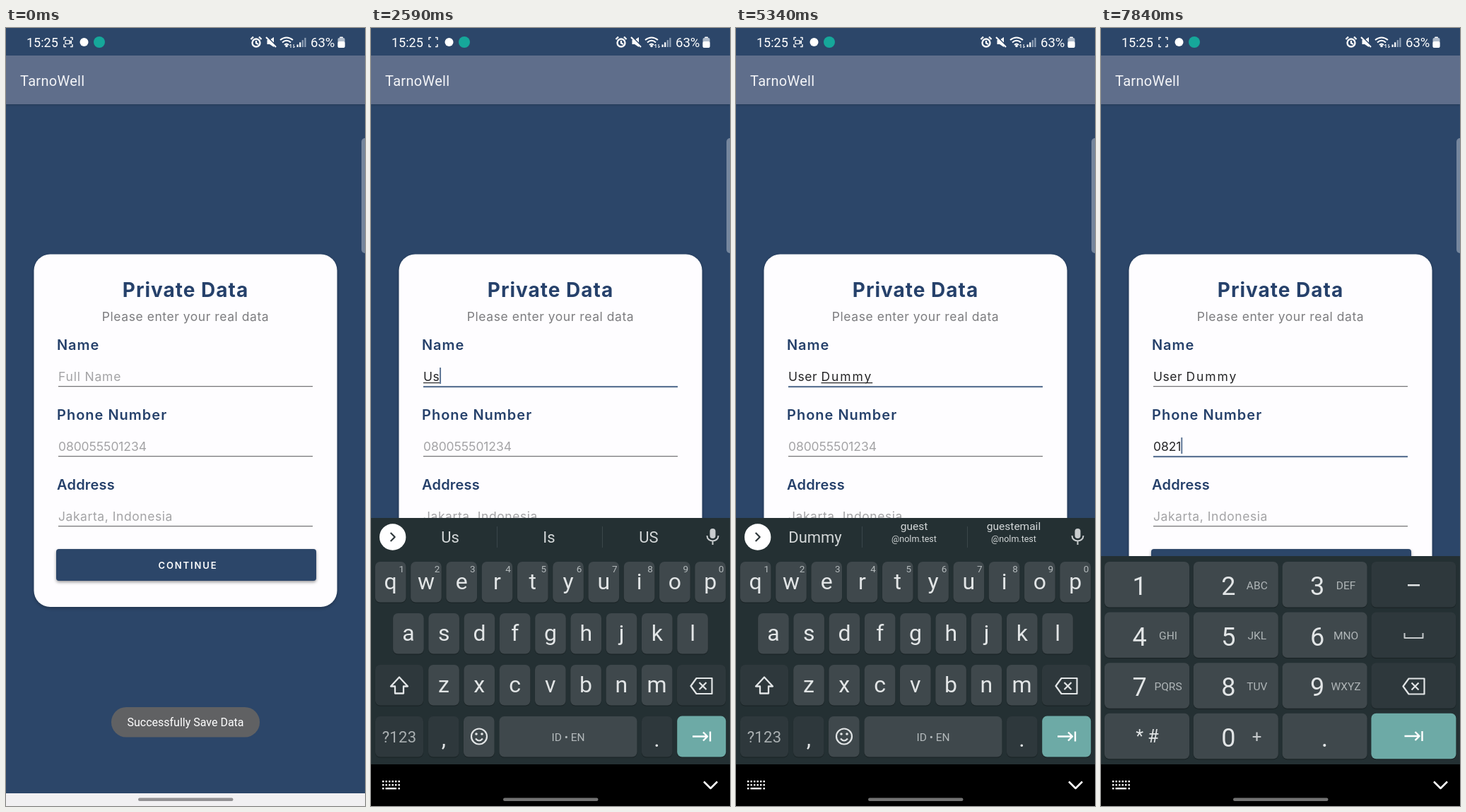
Write an HTML page with a canvas that moves like this. It is 508 by 1102 pixels and loops after 8000 ms.

```html
<!DOCTYPE html>
<html lang="en">
<head>
<meta charset="utf-8">
<title>Private data form</title>
<style>
html, body { margin: 0; width: 100%; height: 100%; overflow: hidden; background: #2c4669; }
canvas { display: block; width: 508px; height: 1102px; }
</style>
</head>
<body>
<canvas id="stage" width="508" height="1102"></canvas>
<script>
const c = document.getElementById('stage').getContext('2d');
const LOOP = 8000, STEP = 1000 / 12;
const NAVY = '#2c4669', INK = '#26416b', KEY = '#3f484c', FUNC = '#2e383c', PRESSED = '#5a666a';
const TEAL = '#6daaa6', LIGHT = '#e2e5e6', BOARD = '#243033';
const ui = size => `${size}px Roboto, sans-serif`;
const form = (size, weight = 400) => `${weight} ${size}px Inter, sans-serif`;
const clamp = v => Math.max(0, Math.min(1, v));

// [tick, key, finished text, word being typed, suggestions]
const nameSteps = [
  [26, 'u', '', 'U', 'U|I|You'],
  [31, 's', '', 'Us', 'Us|Is|US'],
  [33, 'e', '', 'Use', 'Use|Used|User'],
  [36, 'r', '', 'User', 'User|Users|Used'],
  [40, ' ', 'User ', '', 'is|and|can'],
  [46, 'd', 'User ', 'D', 'D|Di|Do'],
  [49, 'u', 'User ', 'Du', 'Du|Di|Id'],
  [51, 'm', 'User ', 'Dum', 'Dum|Dummy|Sum'],
  [54, 'm', 'User ', 'Dumm', 'Dumm|Dummy|Hmm'],
  [58, 'y', 'User ', 'Dummy', 'Dummy|guest@nolm.test|guestemail@nolm.test']
];
const phoneSteps = [[85, '0', '0'], [89, '8', '08'], [91, '2', '082'], [94, '1', '0821']];
const NAME_FOCUS = 6, PHONE_FOCUS = 75;
const latest = (steps, tick) => steps.filter(s => s[0] <= tick).pop();
const pressedKey = (steps, tick) => (steps.find(s => s[0] === tick + 1) || [])[1];

function text(s, x, y, font, color, align = 'left', gap = 0) {
  c.font = font;
  c.fillStyle = color;
  c.textAlign = align;
  c.letterSpacing = gap + 'px';
  c.fillText(s, x, y);
  return c.measureText(s).width;
}
function rect(x, y, w, h, color, r = 0) {
  c.fillStyle = color;
  c.beginPath();
  c.roundRect(x, y, w, h, r);
  c.fill();
}
function shaded(blur, drop, alpha, draw) {
  c.save();
  c.shadowColor = `rgba(0,0,0,${alpha})`;
  c.shadowBlur = blur;
  c.shadowOffsetY = drop;
  draw();
  c.restore();
}
function disc(x, y, r, color) {
  c.fillStyle = color;
  c.beginPath();
  c.arc(x, y, r, 0, 7);
  c.fill();
}
function icon(x, y, d, color = LIGHT, width = 2, fill = false) {
  c.save();
  c.translate(x, y);
  const p = new Path2D(d);
  c.strokeStyle = c.fillStyle = color;
  c.lineWidth = width;
  c.lineJoin = 'round';
  if (fill) c.fill(p);
  if (width) c.stroke(p);
  c.restore();
}

function statusBar(recording) {
  rect(0, 0, 508, 39, NAVY);
  text('15:25', 29, 27, ui(18), '#fff');
  icon(88, 20, 'M-6-3V-6.5H-3M3-6.5H6V-3M6 3V6.5H3M-3 6.5H-6V3', '#fff', 1.4);
  if (recording) icon(88, 20, 'M-4-2.5H2V2.5H-4ZM2 0L4.5-2V2Z', '#fff', 1.2);
  disc(110.5, 20, 6, '#fff');
  disc(132, 20, 8, '#16a79a');
  icon(354, 20, 'M5.5 1A5.5 5.5 0 1 1-5.5 1A5.5 5.5 0 1 1 5.5 1M0-2V1.5L3 3M-7.5-4L-4-7.5M7.5-4L4-7.5', '#fff', 2.3);
  icon(375, 20, 'M-5.5-3H-2L4-7V7L-2 3H-5.5Z', '#fff', 0, true);
  icon(375, 20, 'M-6-8L8 6', NAVY, 2);
  icon(375, 20, 'M-7-7L7 7', '#fff', 2.2);
  icon(397, 20, 'M-9-3Q0-10 9-3M-6 .5Q0-5 6 .5M-3 4Q0 1 3 4', '#fff', 2);
  disc(397, 25.5, 1.8, '#fff');
  icon(405, 24, 'M-2-1V4M-4 1L-2-1M2-1V4M2 4L4 2', '#fff', 1);
  for (let i = 0; i < 4; i++)
    rect(411.5 + i * 3.6, 23.5 - i * 3.2, 2.2, 3.5 + i * 3.2, i < 2 ? '#fff' : '#8fa0b6');
  text('63%', 431, 27, ui(18.5), '#fff');
  rect(472, 12.5, 5, 3, '#fff', 1);
  rect(469.5, 14, 10, 14, '#b0bccb', 2);
  rect(469.5, 19, 10, 9, '#fff', 2);
}

function field(y, label, hint, labelGap, hintGap, focused, value) {
  text(label, 72, y - 44, form(20, 600), INK, 'left', labelGap);
  if (!value) text(hint, 74, y, form(17.5), '#a3a3a5', 'left', hintGap);
  rect(74, y + 7, 360, focused ? 2.2 : 1.3, focused ? '#5d7595' : '#757577');
}

// Draws the entered words, the underline of the active word and the caret.
function entry(y, done, word, gap, underline, caret) {
  let x = 74;
  if (done) x += text(done, x, y, form(17.5), '#252527', 'left', .5);
  if (word) {
    const w = text(word, x, y, form(17.5), '#252527', 'left', gap);
    if (underline) rect(x, y + 2, w, 1.2, '#252527');
    x += w;
  }
  if (caret) rect(x, y - 19, 2, 23, '#5d7595');
}

function page(tick) {
  rect(0, 0, 508, 1102, NAVY);
  shaded(3, 1, .2, () => rect(0, 39, 508, 69, '#5f6e8b'));
  text('TarnoWell', 20, 82, ui(20), '#f4f5f8', 'left', .3);
  shaded(4, 2, .25, () => rect(39.5, 320.5, 429, 499.5, '#fefdff', 23));
  text('Private Data', 254, 381, form(28, 700), INK, 'center', 1);
  text('Please enter your real data', 254, 414.5, form(17.5), '#7c7c7f', 'center', .55);

  const onName = tick >= NAME_FOCUS && tick < PHONE_FOCUS, onPhone = tick >= PHONE_FOCUS;
  const name = latest(nameSteps, tick), phone = latest(phoneSteps, tick);
  const last = onPhone ? (phone || [PHONE_FOCUS])[0] : (name || [NAME_FOCUS])[0];
  const blink = (tick - last) % 12 < 6;
  field(500, 'Name', 'Full Name', .9, .8, onName, name);
  field(599, 'Phone Number', '080055501234', 1, -.1, onPhone, phone);
  field(698, 'Address', 'Jakarta, Indonesia', .2, .56, false);
  const [, , done, word] = name || [0, '', '', ''];
  entry(500, done, word, done ? 1.9 : .4, onName, onName && blink);
  if (onPhone) entry(599, '', phone && phone[2], -.1, false, blink);

  shaded(4, 2, .4, () => rect(71, 738, 368, 45, NAVY, 4));
  text('CONTINUE', 257.5, 765.5, form(13, 600), '#fff', 'center', 1.9);
  rect(503, 156, 10, 163, '#75869d', 5);
  rect(0, 1084, 508, 18, '#f1f0f2');
}

function toast(alpha) {
  if (!alpha) return;
  c.globalAlpha = alpha;
  rect(149, 962, 210, 42.5, '#606163', 21);
  text('Successfully Save Data', 254, 989, ui(16), '#fff', 'center');
  c.globalAlpha = 1;
}

const key = (x, y, w, h, color) => shaded(1, 1, .3, () => rect(x, y, w, h, color, 7));
const backspace = (x, y) => icon(x, y, 'M-15 0L-7-11H15V11H-7ZM-3-5L7 5M7-5L-3 5', LIGHT, 2.2);
const nextArrow = (x, y) => icon(x, y, 'M-13 0H8M2-6L8 0L2 6M12-7V7', '#fff', 2.4);

function toolbar(tick) {
  const step = latest(nameSteps, tick);
  disc(30.7, 721, 18.7, '#fff');
  icon(30.7, 721, step ? 'M-3-6L3 0L-3 6' : 'M3-6L-3 0L3 6', '#30393c', 2.2);
  rect(479.5, 709, 8, 14, '#c9cdcf', 4);
  icon(483.5, 720, 'M-8-1C-8 9 8 9 8-1M0 7V12', '#c9cdcf', 2);
  if (!step) {
    const gray = '#a4aaac';
    icon(98, 721, 'M9 2V-9H-9V9H2ZM9 2H2V9M-4-4V-2M4-4V-2M-5 2Q-2 5 1 3', gray, 2.2);
    text('GIF', 171, 727, form(17, 700), gray, 'center', .8);
    for (let i = 0; i < 8; i++) {
      c.save();
      c.translate(246, 721.5);
      c.rotate(i * Math.PI / 4);
      rect(-2.5, -10.5, 5, 6, gray, 1);
      c.restore();
    }
    disc(246, 721.5, 8, gray);
    disc(246, 721.5, 3.5, BOARD);
    rect(310, 711, 20, 20, gray, 2);
    rect(363.5, 707, 1, 28, '#3a464a');
    for (const x of [401, 409, 417]) disc(x, 721, 2.6, gray);
    return;
  }
  rect(178, 706, 1, 30, '#3a464a');
  rect(327, 706, 1, 30, '#3a464a');
  step[4].split('|').forEach((s, i) => {
    const x = [112, 252, 393][i], at = s.indexOf('@');
    if (at < 0) return text(s, x, 729, ui(22), '#d3d7d8', 'center');
    text(s.slice(0, at), x, 711, ui(15.5), '#d3d7d8', 'center');
    text(s.slice(at), x, 728, ui(12.5), '#d3d7d8', 'center');
  });
}

function letterBoard(tick) {
  const caps = tick >= 22 && tick < 26 || tick >= 42 && tick < 46;
  const shift = tick === 21 || tick === 41;
  const down = pressedKey(nameSteps, tick);
  const show = s => caps ? s.toUpperCase() : s;
  let popup;
  rect(0, 694, 508, 349, BOARD);
  toolbar(tick);
  ['qwertyuiop', 'asdfghjkl', 'zxcvbnm'].forEach((row, r) => {
    const y = 756 + r * 73;
    [...row].forEach((ch, i) => {
      const x = [27.7, 52.9, 103][r] + i * 50.27;
      key(x - 21.8, y, 43.6, 57.5, KEY);
      if (ch === down) popup = [ch, x, y];
      text(show(ch), x, y + 39, ui(32), LIGHT, 'center');
      if (!r) text((i + 1) % 10, x + 15.5, 771, ui(13.5), '#b4babc', 'center');
    });
  });
  key(6, 902, 68, 57.5, shift ? PRESSED : FUNC);
  icon(40, 931.5, 'M0-12L12 1H6V11H-6V1H-12Z', LIGHT, 2.3, caps);
  key(433, 902, 69, 57.5, FUNC);
  backspace(467.5, 932);
  key(6, 975, 68, 57.5, FUNC);
  text('?123', 40, 1012, ui(22), '#a9afb1', 'center', .3);
  key(81, 975, 43.6, 57.5, FUNC);
  text(',', 103, 1017, ui(32), LIGHT, 'center');
  key(131, 975, 43.6, 57.5, KEY);
  icon(153, 1003.5, 'M11 0A11 11 0 1 1-11 0A11 11 0 1 1 11 0M-5 3Q0 9 5 3', LIGHT, 2.2);
  disc(149, 1000, 1.8, LIGHT);
  disc(157, 1000, 1.8, LIGHT);
  key(181.5, 975, 195, 57.5, down === ' ' ? PRESSED : KEY);
  text('ID • EN', 279, 1009.5, ui(15.5), '#b4babc', 'center');
  key(383, 975, 43.6, 57.5, FUNC);
  text('.', 404.5, 1018, ui(32), LIGHT, 'center');
  key(433.2, 974.6, 69, 58, tick === 74 ? '#8fc4c0' : TEAL);
  nextArrow(468, 1003.5);
  if (popup) {
    const [ch, x, y] = popup;
    shaded(6, 2, .4, () => rect(x - 25, y - 89, 51, 147, '#384448', 6));
    text(show(ch), x, y - 42, ui(33), '#fff', 'center');
  }
}

function numberBoard(tick) {
  const down = pressedKey(phoneSteps, tick);
  const letters = ['', 'ABC', 'DEF', 'GHI', 'JKL', 'MNO', 'PQRS', 'TUV', 'WXYZ'];
  rect(0, 748, 508, 295, BOARD);
  for (let i = 0; i < 16; i++) {
    const col = i % 4, row = i >> 2, x = 5 + col * 125.8, y = 756 + row * 71.6;
    const n = row < 3 ? row * 3 + col + 1 : 0;
    const digit = col < 3 && (row < 3 || col === 1);
    const base = col < 3 ? KEY : row < 3 ? FUNC : TEAL;
    key(x, y, 120, 64.5, digit && down === String(n) ? PRESSED : base);
    if (!digit) continue;
    text(n, x + 49.5, y + 47, ui(36), LIGHT, 'center');
    if (n) text(letters[n - 1], x + 90, y + 38.5, ui(15.5), '#b0b6b8', 'center');
  }
  text('* #', 65.5, 1012, ui(25), LIGHT, 'center');
  text('+', 220.5, 1012, ui(24), '#c6cacc', 'center');
  text('.', 316.5, 1018, ui(36), LIGHT, 'center');
  rect(434, 788, 17, 2.5, LIGHT);
  icon(442.5, 860, 'M-13-3V4H13V-3', '#c6cacc', 2);
  backspace(442.5, 932.5);
  nextArrow(442.5, 1003);
}

function keyboard(tick, time, fade) {
  const rise = (1 - clamp((time - 650) / 300)) ** 3;
  if (rise === 1) return;
  c.save();
  c.translate(0, 408 * rise);
  (tick < PHONE_FOCUS ? letterBoard : numberBoard)(tick);
  rect(0, 1043, 508, 59, '#000');
  c.globalAlpha = fade;
  for (let row = 0; row < 3; row++)
    for (let i = 0; i < 6; i++)
      if (row < 2 || i % 5 === 0) rect(16 + i * 4.5, 1066 + row * 5, 2.4, 2.4, '#fff');
  rect(20.5, 1076, 15.5, 2.4, '#fff');
  icon(480.5, 1072, 'M-9.5-4.5L0 5L9.5-4.5', '#fff', 2.5);
  c.restore();
}

function draw() {
  const tick = Math.floor(performance.now() % LOOP / STEP + .001), time = tick * STEP;
  const fade = clamp((time - 1200) / 500), gray = 72 + 42 * fade;
  page(tick);
  keyboard(tick, time, fade);
  toast(1 - clamp((time - 420) / 400));
  rect(187, 1090.5, 134.5, 4.5, tick < 9 ? '#929194' : `rgb(${gray},${gray},${gray})`, 2.2);
  statusBar((time * 1.003 - 10) % 1000 < 500);
  requestAnimationFrame(draw);
}
draw();
</script>
</body>
</html>
```
